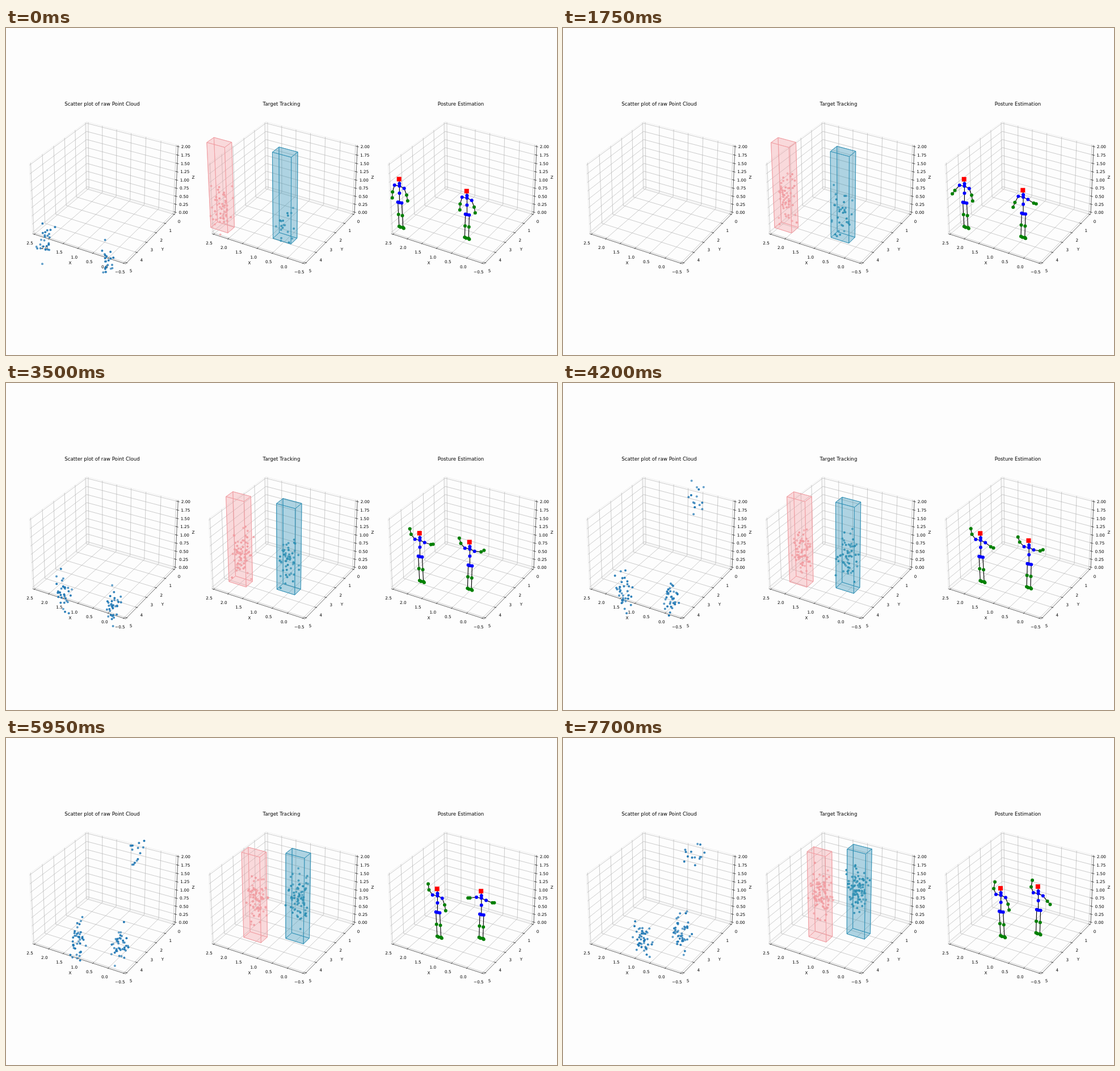
Recreate the animation shown at these times as an HTML page. Size 971x577 px, loop 8000 ms.

```html
<!DOCTYPE html>
<html lang="en">
<head>
<meta charset="utf-8">
<title>Point cloud tracking</title>
<style>
html, body { margin: 0; width: 100%; height: 100%; overflow: hidden; background: #fdfdfd; }
svg { display: block; width: 100%; height: 100%; }
text { font: 7.25px "DejaVu Sans", sans-serif; text-anchor: middle; fill: #000; }
.title { font-size: 8.7px; }
.grid { fill: none; stroke: #b0b0b0; stroke-width: .65; }
.pane { fill: none; stroke: #e8e8e8; stroke-width: .7; }
.axis { fill: none; stroke: #000; stroke-width: .6; }
.bone { fill: none; stroke: #000; stroke-width: 1.15; stroke-linejoin: round; }
.box { fill-opacity: .21; stroke-opacity: .85; stroke-width: .9; stroke-linejoin: round; }
</style>
</head>
<body>
<svg viewBox="0 0 971 577">
  <clipPath id="plot"><rect x="37" y="141" width="296" height="294.5"/></clipPath>
  <g id="axes"></g>
  <g id="raw" clip-path="url(#plot)"></g>
  <g id="targets"></g>
  <g id="bodies"></g>
</svg>
<script>
const LOOP = 8000, STEP = 350, LAST = 22, PANEL = 316;
const $ = id => document.getElementById(id);
const lerp = (a, b, t) => a + (b - a) * t;
const mix = (a, b, t) => a.map((v, i) => lerp(v, b[i], t));
const move = ([x, y], dx, dy) => [x + dx, y + dy];

// Perspective view: azimuth 120, elevation 30, distance 10.
function project(X, Y, Z, panel) {
  const x = (X - 1) * .3658, y = (Y - 2.5) * .2195, z = (Z - 1) * .4114;
  const u = -.866 * x - .5 * y;
  const v = .25 * x - .433 * y + .866 * z;
  const depth = 10 + .433 * x - .75 * y - .5 * z;
  return [174.7 + panel * PANEL + 1642 * u / depth, 285.1 - 1642 * v / depth];
}

const path = (points, cls, close = '') =>
  `<path class="${cls}" d="M${points.map(p => p.map(n => n.toFixed(2))).join('L')}${close}"/>`;
const label = (x, y, s, cls = '') => `<text class="${cls}" x="${x}" y="${y + 2.7}">${s}</text>`;
const dot = ([x, y], r, color, alpha = 1) =>
  `<circle cx="${x.toFixed(1)}" cy="${y.toFixed(1)}" r="${r}" fill="${color}" opacity="${alpha.toFixed(2)}"/>`;

// Padded limits of the panes.
const X0 = -.5625, X1 = 2.5625, Y0 = -.104, Y1 = 5.104, Z0 = -.0417, Z1 = 2.0417;

function drawAxes(title, panel) {
  const line = (cls, ...pts) => path(pts.map(p => project(...p, panel)), cls);
  const dx = panel * PANEL;
  let grid = line('pane', [X1, Y1, Z0], [X1, Y1, Z1], [X1, Y0, Z1], [X0, Y0, Z1]) +
    line('pane', [X1, Y1, Z0], [X1, Y0, Z0], [X0, Y0, Z0]) +
    line('pane', [X1, Y0, Z0], [X1, Y0, Z1]);
  let axes = line('axis', [X1, Y1, Z0], [X0, Y1, Z0], [X0, Y0, Z0], [X0, Y0, Z1]);
  let text = label(169.5 + dx, 134.3, title, 'title') +
    label(113 + dx, 414.5, 'X') + label(276 + dx, 390, 'Y') + label(330 + dx, 263.5, 'Z');
  for (let i = 0; i < 7; i++) {
    const X = 2.5 - i / 2;
    grid += line('grid', [X, Y1, Z0], [X, Y0, Z0], [X, Y0, Z1]);
    axes += line('axis', [X, Y1 - .09, Z0], [X, Y1 + .05, Z0]);
    text += label(42 + dx + 25.7 * i + .13 * i * i, 379 + 8.2 * i + .06 * i * i, X.toFixed(1).replace('-', '\u2212'));
  }
  for (let i = 0; i < 6; i++) {
    grid += line('grid', [X0, i, Z0], [X1, i, Z0], [X1, i, Z1]);
    axes += line('axis', [X0 + .05, i, Z0], [X0 - .03, i, Z0]);
    text += label(305 + dx - 14.7 * i - .46 * i * i, 341 + 16.2 * i + .24 * i * i, i);
  }
  for (let i = 0; i < 9; i++) {
    const Z = i / 4;
    grid += line('grid', [X1, Y1, Z], [X1, Y0, Z], [X0, Y0, Z]);
    axes += line('axis', [X0 + .05, Y0, Z], [X0 - .05, Y0, Z]);
    text += label(312.6 + dx + .53 * i, 325.3 - 14.1 * i - .05 * i * i, Z.toFixed(2));
  }
  return grid + axes + text;
}

// Waypoints: floor X, floor Y, sideways sway in px, lift of left and right arm (0 hangs, 1 is raised).
const WAYPOINT_STEPS = [0, 5, 7, 12, 15, 20, LAST];
const people = [
  {
    color: '#f09ca1', height: 84.5, lean: 3.5, count: [50, 85], rise: [38, 74], drop: 32,
    walk: [[2.44, 4.46, -5, 0, 0], [2.26, 4.3, -3, .2, 0], [2.15, 4.06, -1, .95, .85], [1.9, 3.86, -1, .98, .35],
      [1.62, 3.75, 3, .97, 0], [1.57, 3.45, 5.5, 1.03, 0], [1.41, 3.38, 1, 1.1, 0]]
  },
  {
    color: '#2e8fb3', height: 82.5, lean: 0, count: [20, 90], rise: [26, 80], drop: 46,
    walk: [[.54, 3.77, 4, 0, 0], [.54, 3.68, 1, .1, .4], [.57, 3.61, 2, .97, .75], [.54, 3.2, 2.5, .93, .65],
      [.45, 2.89, 11, .2, .2], [.55, 2.37, 2, 1, 1], [.51, 2.21, 0, 1.1, .2]]
  }
];

function walkAt(walk, step) {
  const next = Math.max(1, WAYPOINT_STEPS.findIndex(s => s >= step));
  const from = WAYPOINT_STEPS[next - 1], to = WAYPOINT_STEPS[next];
  return mix(walk[next - 1], walk[next], (step - from) / (to - from));
}

function seeded(seed) {
  let s = seed * 7919 + 17;
  return () => {
    s = (s + 0x6d2b79f5) | 0;
    let t = Math.imul(s ^ (s >>> 15), s | 1);
    t ^= t + Math.imul(t ^ (t >>> 7), t | 61);
    return ((t ^ (t >>> 14)) >>> 0) / 4294967296;
  };
}

function drawCloud(center, spreadX, spreadY, count, color, seed) {
  const random = seeded(seed);
  const bell = () => (random() + random() + random() - 1.5) * 2;
  let out = '';
  for (let i = 0; i < Math.round(count); i++) {
    out += dot(move(center, bell() * spreadX, bell() * spreadY), 2, color, .65 + .35 * random());
  }
  return out;
}

function drawBox(X, Y, color) {
  const half = .3;
  const ring = Z => [[1, 1], [-1, 1], [-1, -1], [1, -1]].map(([a, b]) => project(X + a * half, Y + b * half, Z, 1));
  const low = ring(0), high = ring(2.52);
  const sides = low.map((p, i) => [p, low[(i + 1) % 4], high[(i + 1) % 4], high[i]]);
  const faces = [low, ...sides, high].map(f => path(f, '', 'Z')).join('');
  return `<g class="box" fill="${color}" stroke="${color}">${faces}</g>`;
}

// Raising an arm swings both segments; the forearm foreshortens halfway.
function arm(shoulder, upperAngle, foreAngle, lift) {
  const polar = (p, degrees, length) =>
    move(p, length * Math.cos(degrees * Math.PI / 180), length * Math.sin(degrees * Math.PI / 180));
  const elbow = polar(shoulder, upperAngle, lerp(12.5, 11, lift));
  return [shoulder, elbow, polar(elbow, foreAngle, 3 + 7.5 * Math.abs(1 - 2 * lift))];
}

function drawBody({ height, lean }, [X, Y, sway, leftLift, rightLift]) {
  const floor = move(project(X, Y, 0, 2), sway, -.7);
  const head = move(floor, 0, -height);
  const neck = move(head, .7, 8), chest = move(head, .7, 12.2), pelvis = move(head, .7, 41.5);
  const spine = mix(chest, pelvis, .43);
  const leftArm = arm(move(head, -8, 10.7), 106 + 130 * leftLift, 93 + 170 * leftLift, leftLift);
  const rightArm = arm(move(head, 9, 16.4), 70 - 95 * rightLift, 80 - 155 * rightLift, rightLift);
  const leg = (hipX, hipY, ankleX, ankleY, toe) => {
    const hip = move(pelvis, hipX, hipY), ankle = move(floor, lean + ankleX, ankleY);
    return [hip, mix(hip, ankle, .51), ankle, move(ankle, toe, 1.5)];
  };
  const leftLeg = leg(-2.8, -.9, -3.4, -1, 2.6), rightLeg = leg(4, .6, 3.4, 1, 1.3);
  const bones = [[head, neck, chest, spine, pelvis], [...leftArm.slice().reverse(), chest, ...rightArm],
    [...leftLeg.slice().reverse(), pelvis, ...rightLeg]];
  const limbs = [leftArm, rightArm, leftLeg, rightLeg];
  const dots = (list, color) => list.map(p => dot(p, 3, color)).join('');
  return bones.map(b => path(b, 'bone')).join('') +
    dots([neck, chest, spine, pelvis, ...limbs.map(l => l[0])], '#00f') +
    dots(limbs.flatMap(l => l.slice(1)), '#008000') +
    `<rect x="${head[0] - 4}" y="${head[1] - 4}" width="8" height="8" fill="#f00"/>`;
}

function draw(step) {
  const progress = step / LAST;
  const density = Math.min(1, Math.abs(step - 5) / 2); // the raw scan thins out briefly
  const rawColor = '#1f77b4';
  // Reflections high on the back wall appear in the second half.
  let raw = step > LAST / 2 ? drawCloud([233, 206], 9, 13, 14, rawColor, step) : '';
  let targets = '', bodies = '';
  people.forEach((person, i) => {
    const { color, walk, count, rise, drop } = person;
    const state = walkAt(walk, step);
    const [X, Y] = state;
    const seed = 100 * (i + 1) + step;
    raw += drawCloud(move(project(X, Y, 0, 0), 3, drop * (1 - progress)), 7, 16, lerp(25, 45, progress) * density, rawColor, seed);
    targets += drawBox(X, Y, color) +
      drawCloud(move(project(X, Y, 0, 1), 0, -lerp(...rise, progress)), 9, 20, lerp(...count, progress), color, seed + 50);
    bodies += drawBody(person, state);
  });
  $('raw').innerHTML = raw;
  $('targets').innerHTML = targets;
  $('bodies').innerHTML = bodies;
}

$('axes').innerHTML = ['Scatter plot of raw Point Cloud', 'Target Tracking', 'Posture Estimation'].map(drawAxes).join('');

let shown = -1;
const start = performance.now();
function tick() {
  const step = Math.min(LAST, Math.floor((performance.now() - start) % LOOP / STEP));
  if (step !== shown) draw(shown = step);
  requestAnimationFrame(tick);
}
tick();
</script>
</body>
</html>
```
